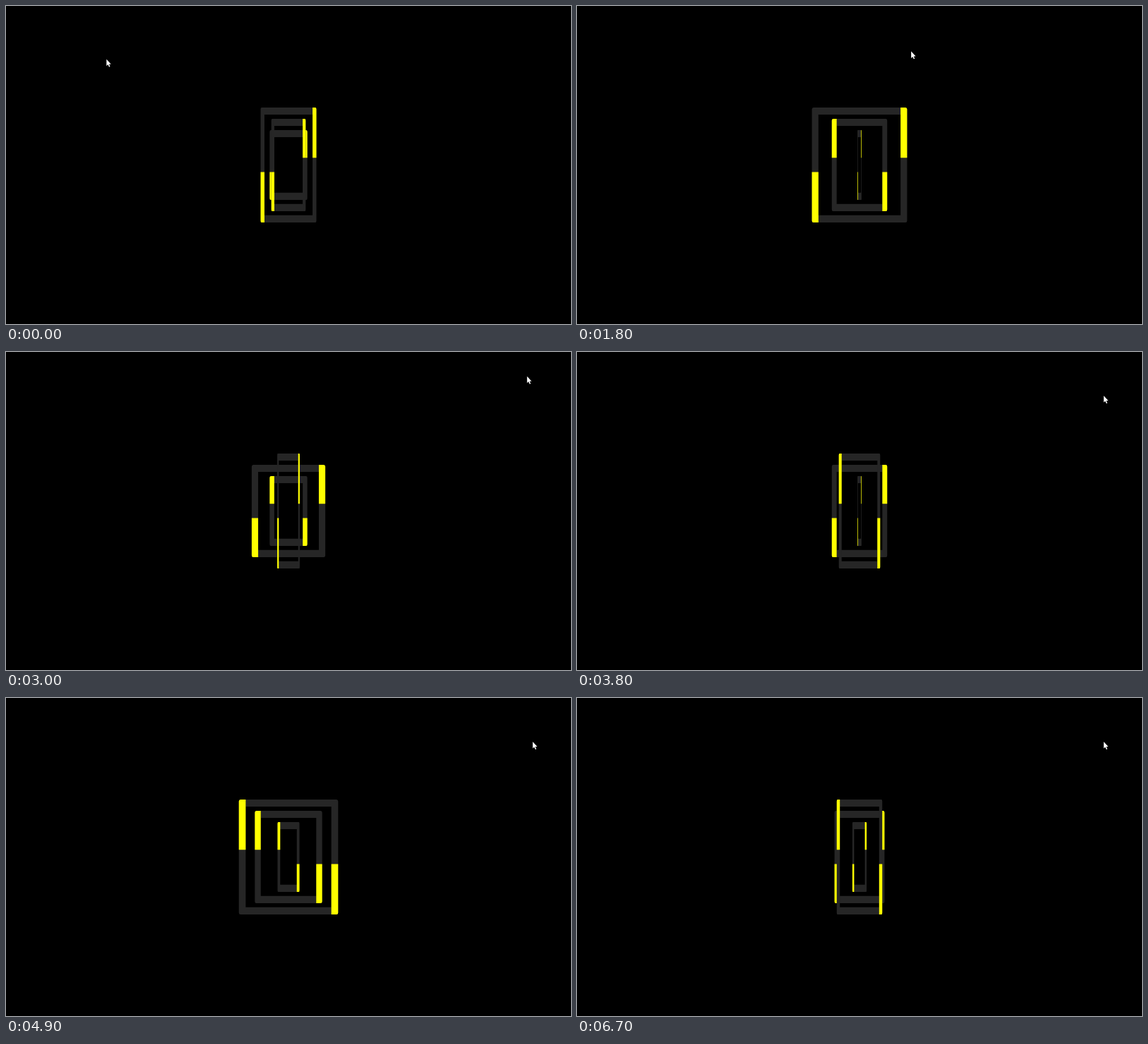
Recreate the animation shown at these times as an HTML page with a canvas. Size 800x451 px, loop 6800 ms.

```html
<!DOCTYPE html>
<html lang="en">
<head>
<meta charset="utf-8">
<title>Spinning frames</title>
<style>
  html, body { margin: 0; height: 100%; overflow: hidden; background: #000; }
  canvas { display: block; }
</style>
</head>
<body>
<canvas id="stage" width="800" height="451"></canvas>
<script>
const ctx = document.getElementById('stage').getContext('2d');
const LOOP = 6800, STEP = 100;
const GREY = '#262626', YELLOW = '#ffff00';
const BORDER = 10.1, GAP = 10.2, RADIUS = 2.5;
const HEAD_START = 2.722; // seconds the rings have already been turning

const arrow = new Path2D('M0 0V9.6L2.1 7.6 3.7 11 5.1 10.4 3.6 7.1 6.4 7Z');

const progress = (t, from, to) => Math.min(1, Math.max(0, (t - from) / (to - from)));
const easeOut = u => 1 - (1 - u) ** 2;

// Ring 0 is the outermost; each inner ring is 32 px smaller and twice as fast.
function drawRing(i, seconds) {
  const w = 147 - 32 * i, h = 163 - 32 * i;
  const x = w / 2, y = h / 2;
  const angle = Math.PI / 4 * 2 ** i * (seconds + HEAD_START);
  ctx.save();
  ctx.translate(400, 225.4);
  ctx.scale(-Math.cos(angle), 1);

  ctx.fillStyle = GREY;
  ctx.beginPath();
  ctx.roundRect(-x, -y, w, h, RADIUS);
  ctx.rect(BORDER - x, BORDER - y, w - 2 * BORDER, h - 2 * BORDER);
  ctx.fill('evenodd');

  ctx.fillStyle = YELLOW;
  ctx.beginPath();
  ctx.roundRect(x - BORDER, -y, BORDER, y - GAP, [0, RADIUS, 0, 0]);
  ctx.roundRect(-x, GAP, BORDER, y - GAP, [0, 0, 0, RADIUS]);
  ctx.fill();
  ctx.restore();
}

// The pointer sweeps up to the right, rests, then drops a little.
function drawPointer(t) {
  const drop = progress(t, 3380, 3680);
  const x = 142.3 + 595.5 * easeOut(progress(t, 1500, 2400)) + 8 * drop;
  const y = 75.5 - 41 * progress(t, 1500, 2600) + 27.5 * drop;
  ctx.save();
  ctx.translate(x, y);
  ctx.fillStyle = '#fff';
  ctx.fill(arrow);
  ctx.restore();
}

function draw() {
  const t = Math.floor(performance.now() % LOOP / STEP) * STEP;
  ctx.fillStyle = '#000';
  ctx.fillRect(0, 0, 800, 451);
  for (let i = 2; i >= 0; i--) drawRing(i, t / 1000);
  drawPointer(t);
  requestAnimationFrame(draw);
}
draw();
</script>
</body>
</html>
```
